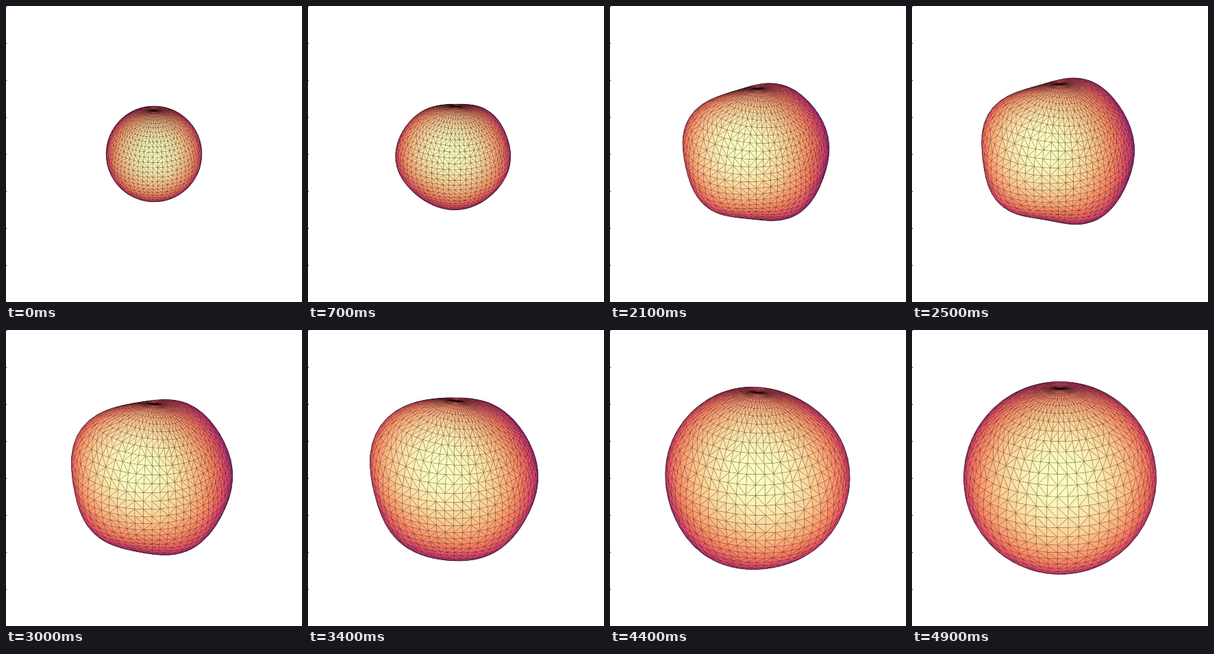
Write an HTML page with a canvas that moves like this. It is 432 by 432 pixels and loops after 5.5 s.

```html
<!DOCTYPE html>
<html lang="en">
<head>
<meta charset="utf-8">
<title>Growing mesh sphere</title>
<style>
  html, body { margin: 0; width: 100%; height: 100%; overflow: hidden; background: #fff; }
  canvas { display: block; width: 432px; height: 432px; }
</style>
</head>
<body>
<canvas id="stage" width="432" height="432"></canvas>
<script>
const ctx = document.getElementById('stage').getContext('2d');
const SIZE = 432, HALF = SIZE / 2;
const STEP = 100, LAST = 49, LOOP = 5500;
const COLS = 64, ROWS = 32;
const CAMERA = 3.5;
const FOCAL = HALF / Math.tan(12.5 * Math.PI / 180);
const PX = FOCAL / CAMERA;
const TILT = Math.PI / 6;

// Bumps in pixels: the outline every 30 degrees counterclockwise from the right,
// then the lean of the front in x and y, and its saddle in xy
const SPOKES = 12;
const FLAT = Array(SPOKES + 3).fill(0);
const BUMPS = [
  [0, FLAT],
  [7, [0, -1, -2, -8, -4, 2, 8, 6, 2.5, 2, 0, 0, -4, 6, -10]],
  [16, [4, 6, 3, -3, -6, 7, 7, 5, 8, 0, 5, 3, -16, 8, -12]],
  [25, [3, 5, 10, 2, -3, 9, 3, 8, -1, -5, 5, 2, -22, 6, -12]],
  [34, [2, 1, 2, -4, 1, 9, 2, 4, 6, 3, 4, 0, -15, 12, -25]],
  [39, [2, 0, -6, -4, 1, 5, 4, 6, 10, 2, 0, 0, -3, 14, -35]],
  [49, FLAT]
];

const MAGMA = ['000004', '1d1147', '51127c', '832681', 'b73779',
  'e75263', 'fc8961', 'fec488', 'fcfdbf']
  .map(h => [0, 2, 4].map(i => parseInt(h.slice(i, i + 2), 16)));

function magma(v) {
  const p = Math.min(1, Math.max(0, v)) * (MAGMA.length - 1);
  const i = Math.min(MAGMA.length - 2, Math.floor(p));
  const rgb = MAGMA[i].map((c, k) => Math.round(c + (MAGMA[i + 1][k] - c) * (p - i)));
  return `rgb(${rgb})`;
}

// Unit sphere, tilted towards the camera
const dirs = [];
for (let j = 0; j < ROWS; j++) {
  for (let i = 0; i < COLS; i++) {
    const u = 2 * Math.PI * i / (COLS - 1), v = Math.PI * j / (ROWS - 1);
    const x = Math.cos(u) * Math.sin(v);
    const y = Math.cos(v);
    const z = -Math.sin(u) * Math.sin(v);
    dirs.push({
      x,
      y: y * Math.cos(TILT) - z * Math.sin(TILT),
      z: y * Math.sin(TILT) + z * Math.cos(TILT)
    });
  }
}

// Grid cells split along irregularly chosen diagonals
let seed = 7;
function random() {
  seed = (seed * 16807) % 2147483647;
  return seed / 2147483647;
}
const faces = [];
for (let j = 0; j < ROWS - 1; j++) {
  for (let i = 0; i < COLS - 1; i++) {
    const a = j * COLS + i, b = a + 1, c = a + COLS, d = c + 1;
    if (random() < 0.5) faces.push([a, b, c], [b, d, c]);
    else faces.push([a, b, d], [a, d, c]);
  }
}

function slope(k, i) {
  if (k === 0 || k === BUMPS.length - 1) return 0;
  const [t0, p] = BUMPS[k - 1], [t1, q] = BUMPS[k + 1];
  return (q[i] - p[i]) / (t1 - t0);
}

function bumpsAt(n) {
  let k = 0;
  while (k < BUMPS.length - 2 && n >= BUMPS[k + 1][0]) k++;
  const [t0, p] = BUMPS[k], [t1, q] = BUMPS[k + 1];
  const span = t1 - t0, s = (n - t0) / span;
  return p.map((a, i) => {
    const m0 = slope(k, i) * span, m1 = slope(k + 1, i) * span;
    return a * (1 + 2 * s) * (1 - s) ** 2 + m0 * s * (1 - s) ** 2
      + q[i] * s * s * (3 - 2 * s) + m1 * s * s * (s - 1);
  });
}

// Fourier terms of the outline, used as a smooth field over the sphere
function harmonics(outline) {
  return [0, 1, 2, 3, 4, 5, 6].map(m => {
    const w = (m % 6 ? 2 : 1) / SPOKES;
    let re = 0, im = 0;
    outline.forEach((d, j) => {
      re += w * d * Math.cos(m * j * Math.PI / 6);
      im += w * d * Math.sin(m * j * Math.PI / 6);
    });
    return [re, im];
  });
}

function field(terms, [leanX, leanY, saddle], { x, y, z }) {
  let re = 1, im = 0, sum = z * (leanX * x + leanY * y + saddle * x * y);
  for (const [a, b] of terms) {
    sum += a * re + b * im;
    [re, im] = [re * x - im * y, re * y + im * x];
  }
  return sum;
}

function project(n) {
  const radius = 0.25 + 0.25 * n / LAST;
  const bumps = bumpsAt(n);
  const terms = harmonics(bumps.slice(0, SPOKES));
  const front = bumps.slice(SPOKES);
  return dirs.map(d => {
    const r = radius + field(terms, front, d) / PX;
    const w = 1 / (CAMERA - d.z * r);
    return { x: HALF + FOCAL * d.x * r * w, y: HALF - FOCAL * d.y * r * w, w };
  });
}

function draw(n) {
  ctx.fillStyle = '#fff';
  ctx.fillRect(0, 0, SIZE, SIZE);

  const pts = project(n);
  const tris = faces.map(f => {
    const p = f.map(i => pts[i]);
    return { p, near: (p[0].w + p[1].w + p[2].w) / 3 };
  }).sort((a, b) => a.near - b.near);
  const lo = tris[0].near, hi = tris[tris.length - 1].near;

  ctx.strokeStyle = '#000';
  ctx.lineWidth = 0.15;
  ctx.lineJoin = 'round';
  for (const { p: [a, b, c], near } of tris) {
    ctx.beginPath();
    ctx.moveTo(a.x, a.y);
    ctx.lineTo(b.x, b.y);
    ctx.lineTo(c.x, c.y);
    ctx.closePath();
    ctx.fillStyle = magma((near - lo) / (hi - lo));
    ctx.fill();
    ctx.stroke();
  }

  ctx.fillStyle = '#000';
  for (let y = 0; y < SIZE; y += 54) ctx.fillRect(0, y, 1, 1);
}

const start = performance.now();
let shown = -1;
function tick() {
  const t = (performance.now() - start) % LOOP;
  const n = Math.min(LAST, Math.floor(t / STEP));
  if (n !== shown) draw(shown = n);
  requestAnimationFrame(tick);
}
tick();
</script>
</body>
</html>
```
